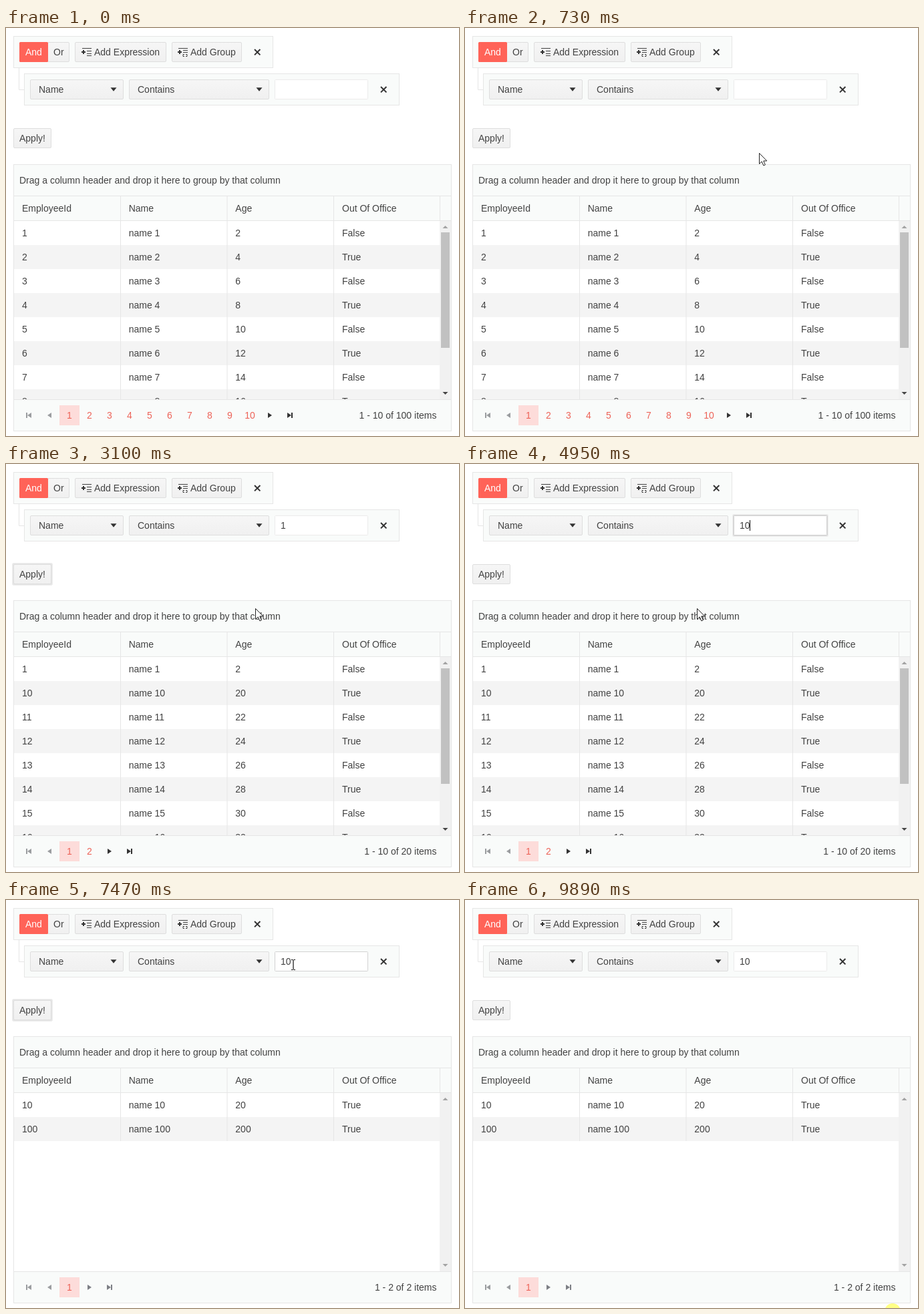
An HTML page that plays this animation: 678 px wide and 611 px high, repeating every 9.96 s.

```html
<!DOCTYPE html>
<html lang="en">
<head>
<meta charset="utf-8">
<title>Filtered grid</title>
<style>
  html, body { margin: 0; width: 100%; height: 100%; overflow: hidden; background: #fff; }
  svg { display: block; width: 678px; height: 611px; }
  text { font: 14px Arial, "Liberation Sans", sans-serif; white-space: pre; }
</style>
</head>
<body>
<svg id="stage" viewBox="0 0 678 611">
  <defs>
    <linearGradient id="btn" x2="0" y2="1"><stop stop-color="#f6f6f6"/><stop offset="1" stop-color="#f0f0f0"/></linearGradient>
    <linearGradient id="hot" x2="0" y2="1"><stop stop-color="#efefef"/><stop offset="1" stop-color="#e9e9e9"/></linearGradient>
    <clipPath id="body"><rect x="12" y="289" width="654" height="267"/></clipPath>
  </defs>
  <g id="base"></g>
  <g id="filter"></g>
  <g id="rows" clip-path="url(#body)"></g>
  <g id="pager"></g>
  <g id="pointer">
    <circle id="click" r="12" fill="#ff0" fill-opacity=".48"/>
    <path id="arrow" d="M.5 .5V16.5L4.2 13L6.9 19L9.4 17.9L6.8 12H11.8Z" fill="#fff" stroke="#222" stroke-linejoin="round"/>
    <path id="beam" d="M-3-7.5H-.5M.5-7.5H3M0-7V7M-3 7.5H-.5M.5 7.5H3" fill="none" stroke="#111" stroke-width="1.2"/>
  </g>
</svg>
<script>
const LOOP = 9960;
const INK = '#424242', LINE = '#e6e6e6', PANEL = '#f9fbfa', RED = '#ff6358';
const ROW = 36, TOP = 289;
const $ = id => document.getElementById(id);

// Markup helpers
const rect = (x, y, w, h, fill, r = 0) => `<rect x="${x}" y="${y}" width="${w}" height="${h}" rx="${r}" fill="${fill}"/>`;
const box = (x, y, w, h, fill, stroke = LINE, r = 0) =>
  `<rect x="${x + .5}" y="${y + .5}" width="${w - 1}" height="${h - 1}" rx="${r}" fill="${fill}" stroke="${stroke}"/>`;
const text = (x, y, s, fill = INK, anchor = 'start') =>
  `<text x="${x}" y="${y}" fill="${fill}" text-anchor="${anchor}">${s}</text>`;
const line = (d, color = LINE, w = 1) => `<path d="${d}" fill="none" stroke="${color}" stroke-width="${w}"/>`;
const triangle = (x, y, w, h, fill) => `<path d="M${x - w} ${y - h / 2}h${2 * w}l${-w} ${h}z" fill="${fill}"/>`;
const sideways = (x, y, dir, fill) => `<path d="M${x - 3 * dir} ${y - 4}v8l${6 * dir}-4z" fill="${fill}"/>`;
const button = (x, y, w, label, pad = 8, fill = 'url(#btn)') =>
  box(x, y, w, 30, fill, '#dedede', 1.5) + text(x + 1 + pad, y + 20, label);
const dropdown = (x, w, label) => button(x, 77, w, label, 12) + triangle(x + w - 15, 92, 4.5, 5.5, '#333');
const cross = (x, y) => line(`M${x - 4} ${y - 4}l8.4 8.4m0-8.4l-8.4 8.4`, '#333', 2);
const plusIcon = (x, lines) => line(`M${x + 1} 30.5h14` + lines, INK) + line(`M${x} 36h6m-3-3v6`, '#333', 2);

const textX = i => 24 + 159.67 * i;
const columnLines = (y, h) => [0, 1, 2].map(i => line(`M${171.5 + 159.5 * i} ${y}v${h}`)).join('');

function drawBase() {
  $('base').innerHTML = [
    box(11, 12, 389, 48, PANEL), line('M19.5 60V92.5H27'), box(27, 68, 562, 48, PANEL),
    button(62, 21, 33, 'Or'), rect(20, 21, 43, 30, RED, 1.5), text(29, 41, 'And', '#fff'),
    button(103, 21, 137, 'Add Expression', 28), plusIcon(113, 'm-7 4h7m-7 4h7m-7 3h7'),
    button(248, 21, 105, 'Add Group', 27), plusIcon(257, 'm-7 3h7m-7 3h7m-5 3h-2v3h2m2-3h2v3h-2'),
    cross(376, 36), cross(565, 92),
    dropdown(36, 140, 'Name'), dropdown(184, 210, 'Contains'),
    box(11, 204, 656, 400, '#fff'), rect(12, 205, 654, 83, PANEL), rect(12, 557, 654, 46, PANEL),
    line('M11 251.5H667M11 288.5H667M11 556.5H667M649.5 252V288'), columnLines(252, 36),
    text(20, 233, 'Drag a column header and drop it here to group by that column'),
    ...['EmployeeId', 'Name', 'Age', 'Out Of Office'].map((h, i) => text(textX(i), 275, h))
  ].join('');
}

// Pointer moves: each is a quadratic curve with an ease-out power
const field = [430, 97], apply = [53, 165], rest = [372, 216], exit = [634, 607];
const moves = [
  { start: 310, end: 1260, from: [560, 561], via: [450, 363], to: field, power: 3 },
  { start: 2080, end: 2540, from: field, via: [300, 260], to: apply, power: 2 },
  { start: 2670, end: 3050, from: apply, via: [180, 220], to: rest, power: 1.5 },
  { start: 3100, end: 3500, from: rest, via: [425, 170], to: field, power: 2 },
  { start: 4820, end: 5730, from: field, via: [365, 332], to: apply, power: 3 },
  { start: 6230, end: 6560, from: apply, via: [173, 220], to: rest, power: 1.5 },
  { start: 6810, end: 7470, from: rest, via: [425, 170], to: field, power: 2 },
  { start: 8230, end: 9200, from: field, via: [431, 299], to: exit, power: 1.5 },
  { start: 9590, end: 9591, from: exit, via: exit, to: [640, 616], power: 1 }
];
const clicks = [
  { at: 1510, on: 'field' }, { at: 2570, on: 'apply' }, { at: 3680, on: 'field' },
  { at: 5860, on: 'apply' }, { at: 9890, on: 'page' }
];
const typed = [1830, 4570];
const CLICK = 100, RELOAD = 70, BLINK = 570;
const lastBefore = (list, t, key) => list.filter(e => key(e) <= t).pop();

function pointerAt(t) {
  const move = lastBefore(moves, t, m => m.start);
  if (!move) return null;
  const { start, end, from, via, to, power } = move;
  const s = 1 - (1 - Math.min(1, (t - start) / (end - start))) ** power;
  const [x, y] = [0, 1].map(i =>
    Math.round((1 - s) ** 2 * from[i] + 2 * s * (1 - s) * via[i] + s * s * to[i]));
  return { x, y };
}

const inside = (p, x, y, w, h) => p && p.x >= x && p.x < x + w && p.y >= y && p.y < y + h;
const overField = p => inside(p, 402, 77, 140, 30);
const people = Array.from({ length: 100 }, (_, i) => i + 1);
const matching = query => people.filter(id => `name ${id}`.includes(query));
const valueAt = t => '10'.slice(0, typed.filter(k => k <= t).length);

function queryAt(t) {
  const sent = lastBefore(clicks.filter(c => c.on === 'apply'), t - RELOAD, c => c.at);
  return sent ? valueAt(sent.at) : '';
}

function filterMarkup(t, p, click) {
  const focus = click && click.on;
  const value = valueAt(t);
  let s = '';
  if (focus === 'field') s += rect(400, 75, 144, 34, '#efefef', 2) + rect(401, 76, 142, 32, '#dadada', 2);
  s += box(402, 77, 140, 30, '#fff', focus === 'field' || overField(p) ? '#d2d2d2' : '#ebebeb', 1);
  s += text(411, 97, value);
  if (focus === 'field') {
    const since = Math.max(click.at, ...typed.filter(k => k <= t));
    if (Math.floor((t - since) / BLINK) % 2 === 0) s += rect(411 + Math.floor(value.length * 7.8), 84, 1, 16, '#111');
  }
  if (focus === 'apply') s += box(9, 148, 61, 34, '#e6e6e6', '#ededed', 2);
  return s + button(11, 150, 57, 'Apply!', 8, inside(p, 11, 150, 57, 30) ? 'url(#hot)' : 'url(#btn)');
}

function rowsMarkup(list, p) {
  const scrolls = list.length * ROW > 267;
  let s = '';
  list.slice(0, 8).forEach((id, i) => {
    const y = TOP + ROW * i;
    const hover = inside(p, 12, y, 637, Math.min(ROW, 556 - y));
    s += rect(12, y, 637, ROW, hover ? '#ebecec' : i % 2 ? '#f4f4f4' : '#fff') + columnLines(y, ROW);
    [id, 'name ' + id, id * 2, id % 2 ? 'False' : 'True'].forEach((v, c) => s += text(textX(c), y + 23, v));
  });
  s += rect(649, TOP, 17, 267, '#f1f1f1');
  if (scrolls) s += rect(651, 306, 13, 173, '#c1c1c1');
  return s + triangle(657.5, 298, 4, -4, '#a3a3a3') + triangle(657.5, 547, 4, 4, scrolls ? '#444' : '#a3a3a3');
}

function pagerMarkup(total) {
  const pages = Math.ceil(total / 10);
  const slot = i => 95 + 30 * i;
  const off = '#9b9da0', on = pages > 1 ? '#333' : '#7d7f85';
  let s = rect(80, 565, 30, 30, '#fddcda');
  for (let i = 0; i < pages; i++) s += text(slot(i), 585, i + 1, '#ed6358', 'middle');
  s += rect(30, 576, 2, 8, off) + sideways(35, 580, -1, off) + sideways(65, 580, -1, off);
  s += sideways(slot(pages), 580, 1, on) + sideways(slot(pages + 1) - 1, 580, 1, on) + rect(slot(pages + 1) + 2, 576, 2, 8, on);
  return s + text(644.5, 585, `1 - ${Math.min(10, total)} of ${total} items`, INK, 'end');
}

const shown = {};
function put(id, markup) {
  if (shown[id] !== markup) $(id).innerHTML = shown[id] = markup;
}
const toggle = (id, on) => $(id).setAttribute('visibility', on ? 'visible' : 'hidden');

function render(t) {
  const p = pointerAt(t);
  const click = lastBefore(clicks, t, c => c.at);
  const list = matching(queryAt(t));
  put('filter', filterMarkup(t, p, click));
  put('rows', rowsMarkup(list, p));
  put('pager', pagerMarkup(list.length));
  if (p) $('pointer').setAttribute('transform', `translate(${p.x} ${p.y})`);
  toggle('arrow', p && !overField(p));
  toggle('beam', overField(p));
  toggle('click', click && t - click.at < CLICK);
}

drawBase();
const began = performance.now();
function tick() {
  render((performance.now() - began) % LOOP);
  requestAnimationFrame(tick);
}
render(0);
requestAnimationFrame(tick);
</script>
</body>
</html>
```
